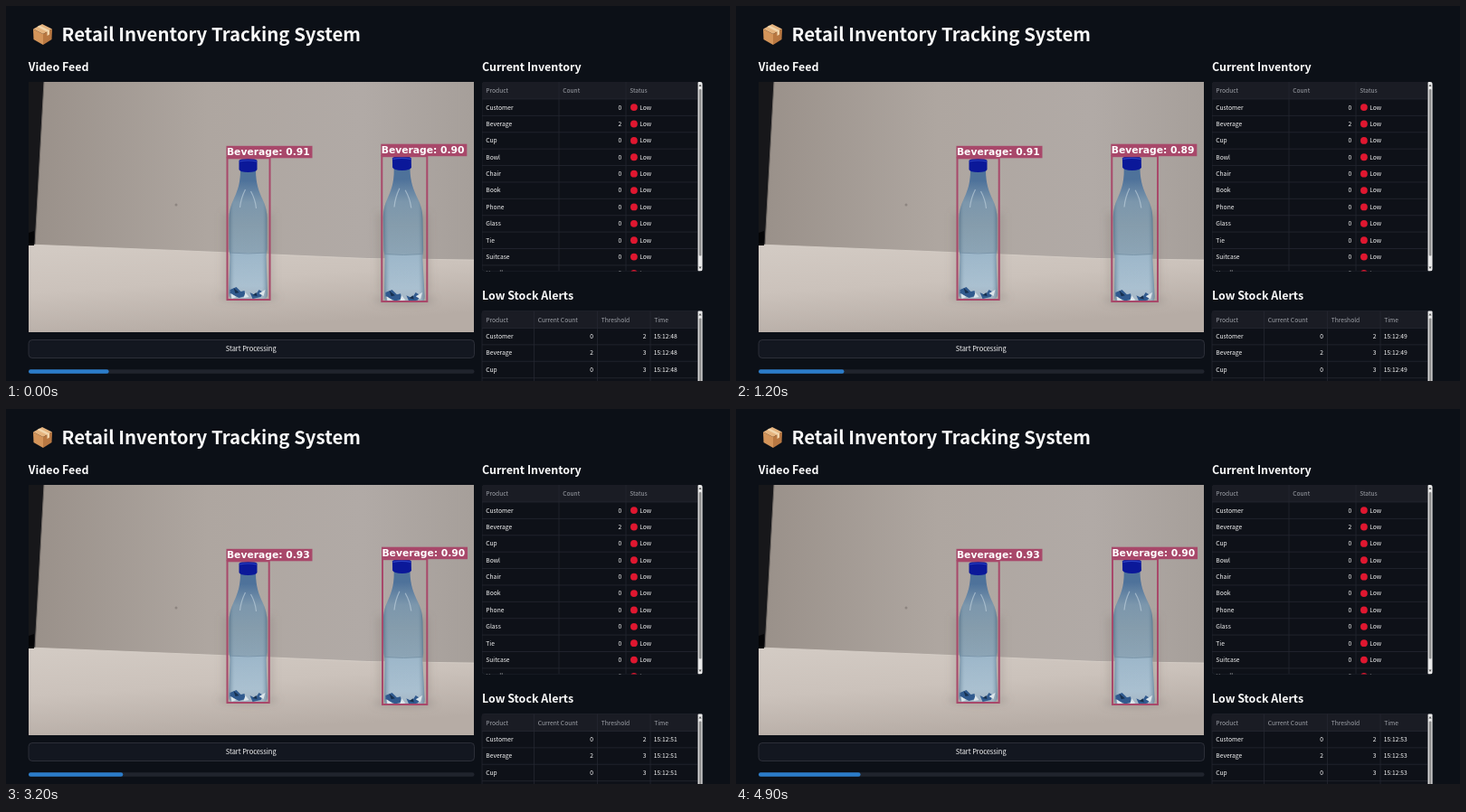
Recreate the animation shown at these times as an HTML page. Size 800 by 415 pixels, loop 5000 ms.

```html
<!DOCTYPE html>
<html lang="en">
<head>
<meta charset="utf-8">
<title>Retail Inventory Tracking System</title>
<style>
html, body { margin: 0; width: 100%; height: 100%; overflow: hidden; background: #0c1017; }
svg { display: block; width: 100%; height: 100%; }
text { font-family: "Noto Sans CJK JP", "Noto Sans CJK SC", "Noto Sans CJK", "Open Sans", sans-serif; fill: #fafafa; }
.title { font-size: 20.4px; font-weight: 700; }
.head { font-size: 12.45px; font-weight: 700; }
.cell { font-size: 6.7px; font-weight: 500; }
.dim { fill: #a0a3aa; }
.tag { font: 700 10.75px "DejaVu Sans", sans-serif; fill: #fff; }
.line { stroke: #252832; stroke-width: .8; }
.end { text-anchor: end; }
</style>
</head>
<body>
<svg viewBox="0 0 800 415">
  <defs>
    <linearGradient id="wall">
      <stop offset="0" stop-color="#999089"/><stop offset=".4" stop-color="#aea6a0"/>
      <stop offset=".75" stop-color="#b1aaa6"/><stop offset="1" stop-color="#a69f9a"/>
    </linearGradient>
    <linearGradient id="desk" x2=".35" y2="1">
      <stop offset="0" stop-color="#d3cbc4"/><stop offset=".5" stop-color="#cbc2bb"/>
      <stop offset="1" stop-color="#b6aca5"/>
    </linearGradient>
    <linearGradient id="water" x2="0" y2="1">
      <stop offset=".08" stop-color="#456a95"/><stop offset=".25" stop-color="#7893a9"/>
      <stop offset=".42" stop-color="#8299a9"/><stop offset=".64" stop-color="#8aa2b3"/>
      <stop offset=".65" stop-color="#9db7ca"/><stop offset=".9" stop-color="#abc1d1"/>
      <stop offset="1" stop-color="#a5b3c1"/>
    </linearGradient>
    <linearGradient id="sides">
      <stop offset="0" stop-color="#34566f" stop-opacity=".5"/><stop offset=".16" stop-color="#9fb8c8" stop-opacity=".1"/>
      <stop offset=".85" stop-color="#9fb8c8" stop-opacity=".1"/><stop offset="1" stop-color="#34566f" stop-opacity=".5"/>
    </linearGradient>
    <filter id="soft" x="-50%" y="-50%" width="200%" height="200%"><feGaussianBlur stdDeviation="4"/></filter>
    <clipPath id="video"><rect x="25" y="84" width="492" height="277"/></clipPath>
    <clipPath id="stock"><rect x="526" y="84" width="244" height="209.5" rx="3"/></clipPath>
    <path id="shape" d="M-8.5 13C-8.5 28-12 36-16 45Q-21 55-21 66V100L-20 108-21.5 149Q-21.5 155-17 155H17Q21.5 155 21.5 149L20 108 21 100V66Q21 55 16 45C12 36 8.5 28 8.5 13Z"/>
    <g id="bottle">
      <g filter="url(#soft)" fill="#746b66">
        <rect x="-28" y="60" width="56" height="86" opacity=".2"/>
        <ellipse cy="153" rx="33" ry="4" opacity=".4"/>
      </g>
      <use href="#shape" fill="url(#water)"/>
      <use href="#shape" fill="url(#sides)"/>
      <path d="M-20 104Q0 106 20 104" fill="none" stroke="#7691a6" stroke-width=".8"/>
      <path d="M-3 34Q-8 44-9 54M3 36Q8 45 9 55" fill="none" stroke="#c3d4df" stroke-width="1.2" opacity=".6"/>
      <path d="M-20 145l7-3 5 5 4-1 1 6-7 2-10-5zM2 148l6 3 4-6 5 3-3 5-9 2z" fill="#315a8e"/>
      <path d="M-16 143l6 5-4 1zM5 151l4-3 1 4z" fill="#17304f"/>
      <path d="M-19 149l6 4-5 2zM-3 148l4 5-6 1zM12 149l7-4-2 7z" fill="#dce5ea"/>
      <path d="M-10 2Q-9.500 0 0 0T10 2V12Q9 15 0 15T-10 12Z" fill="#0b1899"/>
      <path d="M-9.500 3Q0 1 9.500 3" fill="none" stroke="#2c43c4" stroke-width="1.2"/>
    </g>
  </defs>
  <rect width="800" height="415" fill="#0c1017"/>

  <path d="M30 25.500 40 20 51 25.500 41 31z" fill="#e5b47f"/>
  <path d="M30 25.500 41 31V43L30.500 37z" fill="#d4955a"/>
  <path d="M51 25.500 41 31V43L50.500 37z" fill="#b97842"/>
  <path d="M34.500 23 45.500 28.500V33L48 31.500V27L37 21.500z" fill="#f1d6ae"/>
  <text class="title" x="61.5" y="39">Retail Inventory Tracking System</text>
  <text class="head" x="24.700" y="71.700">Video Feed</text>
  <text class="head" x="526" y="71.700">Current Inventory</text>
  <text class="head" x="526" y="324.700">Low Stock Alerts</text>

  <g clip-path="url(#video)">
    <rect x="25" y="84" width="492" height="277" fill="url(#wall)"/>
    <path d="M25 84H42L32 265H25Z" fill="#17171a"/>
    <path d="M42 84 32 265" stroke="#746d68"/>
    <path d="M25 264 200 271 400 279.500 517 281V361H25Z" fill="url(#desk)"/>
    <path d="M25 264 200 271 400 279.500 517 281" fill="none" stroke="#d8d1ca" stroke-width=".8"/>
    <path d="M25 251l6-2v16h-6z" fill="#050507"/>
    <circle cx="188" cy="220" r="1.500" fill="#8d8580"/>
    <use href="#bottle" transform="translate(267.5 169)"/>
    <use href="#bottle" transform="translate(437.3 166.3) skewX(1.1) scale(1.04)"/>
    <g id="marks"></g>
  </g>

  <rect x="25" y="369.500" width="492.500" height="20" rx="4" fill="#131720" stroke="#343740" stroke-width=".8"/>
  <text x="270.700" y="382.300" font-size="7.430" text-anchor="middle">Start Processing</text>
  <rect x="25" y="402.300" width="492.500" height="4.500" rx="2.200" fill="#20242d"/>
  <rect id="bar" x="25" y="402.300" height="4.500" rx="2.200" fill="#2b7cc9"/>

  <g id="inventory" clip-path="url(#stock)"></g>
  <g id="alerts"></g>
</svg>
<script>
const $ = id => document.getElementById(id);
const box = (x, y, w, h, attrs) => `<rect x="${x}" y="${y}" width="${w}" height="${h}" ${attrs}/>`;
const cell = (x, y, s, cls = '') => `<text class="cell ${cls}" x="${x}" y="${y + 2.4}">${s}</text>`;
const line = (x1, y1, x2, y2) => `<path class="line" d="M${x1} ${y1}L${x2} ${y2}"/>`;
const PITCH = 18.39;

// Frame, heading row, grid lines and scrollbar shared by both tables
function table(top, height, cols, heads) {
  let s = box(526, top, 243.5, height, 'rx="3" fill="#0e1118" stroke="#252832" stroke-width=".8"');
  s += box(526, top, 238, 19, 'fill="#1a1c24"');
  for (let y = top + 19; y < top + height; y += PITCH) s += line(526, y, 764, y);
  cols.forEach((x, i) => {
    if (i) s += line(x, top, x, top + height);
    s += cell(x + 4.2, top + 9.7, heads[i], 'dim');
  });
  s += box(764.5, top, 5, height, 'rx="1" fill="#e9e9e9"');
  s += box(765.8, top + 8, 2.6, height - 25, 'rx="1" fill="#8d8d8d"');
  return s + `<path d="M765.500 ${top + 5}l1.500-2.500 1.500 2.500zM765.500 ${top + height - 5}l1.500 2.500 1.500-2.500z" fill="#555"/>`;
}

const products = 'Customer Beverage Cup Bowl Chair Book Phone Glass Tie Suitcase Handbag'.split(' ');
$('inventory').innerHTML = table(84, 209.5, [526, 611, 685], ['Product', 'Count', 'Status']) +
  products.map((name, i) => {
    const y = 112.1 + i * PITCH;
    return cell(530.3, y, name) + cell(680.3, y, i == 1 ? 2 : 0, 'end') +
      `<circle cx="693.900" cy="${y}" r="3.900" fill="#df1730"/>` + cell(700.2, y, 'Low');
  }).join('');

$('alerts').innerHTML = table(337.5, 110, [526, 583.5, 653.5, 712], ['Product', 'Current Count', 'Threshold', 'Time']) +
  products.slice(0, 3).map((name, i) => {
    const y = 365.5 + i * PITCH;
    return cell(530.3, y, name) + cell(649, y, i == 1 ? 2 : 0, 'end') +
      cell(707.5, y, i ? 3 : 2, 'end') + cell(715.7, y, '', 'clock');
  }).join('');
const clocks = document.querySelectorAll('.clock');

// start ms, left box's right edge, right box's edges, both scores
const detections = [
  [0, 291.5, 415.3, 465.3, '0.91', '0.90'],
  [600, 291.5, 416, 466, '0.91', '0.90'],
  [1000, 290.7, 415.3, 466, '0.91', '0.89'],
  [1800, 291.5, 415.3, 466, '0.91', '0.89'],
  [2700, 290.7, 416, 465.3, '0.93', '0.90'],
  [3700, 291.5, 416, 465.3, '0.93', '0.90'],
  [4400, 290.7, 416, 466, '0.93', '0.90']
];

const mark = (x, right, top, bottom, score) =>
  box(x, top, right - x, bottom - top, 'fill="none" stroke="#a8486a" stroke-width="2"') +
  box(x - 1, top - 13.5, 95, 13.5, 'fill="#a8486a"') +
  `<text class="tag" x="${x - .6}" y="${top - 3.2}">Beverage: ${score}</text>`;

let shown;
function draw(now) {
  const t = Math.floor(now % 5000 / 100) * 100;
  if (t !== shown) {
    shown = t;
    const [, edge, x, right, a, b] = detections.findLast(d => d[0] <= t);
    $('marks').innerHTML = mark(244.5, edge, 168.3, 325, a) + mark(x, right, 166.2, 327, b);
    $('bar').setAttribute('width', 88.6 + t * 24 / 4900);
    clocks.forEach(c => c.textContent = '15:12:' + Math.floor(48.4 + t / 1000));
  }
  requestAnimationFrame(draw);
}
draw(performance.now());
</script>
</body>
</html>
```
